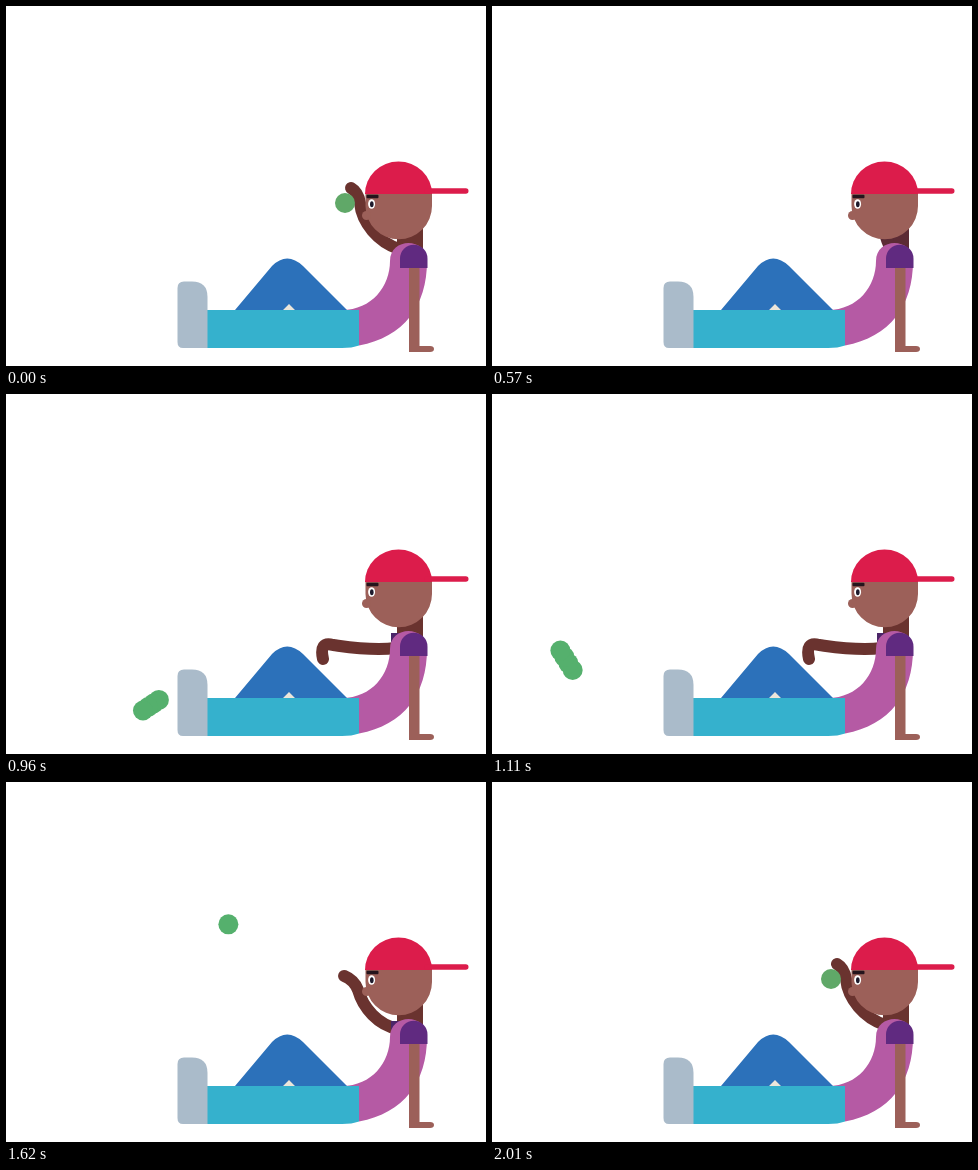
An HTML page without scripts that plays this animation: 480 by 360 pixels, repeating every 2.04 s.

```html
<!DOCTYPE html>
<html lang="en">
<head>
<meta charset="utf-8">
<title>Ball against the wall</title>
<style>
html, body { margin: 0; width: 100%; height: 100%; overflow: hidden; background: #fff; }
svg { display: block; width: 100vw; height: 100vh; --loop: 2.04s; }
.skin { fill: #9c6059; }
.cap { fill: #dc1c4b; }
.far { animation: shade var(--loop) linear infinite; }
.neck { fill: currentColor; }
.arm {
  fill: none; stroke: currentColor; stroke-width: 12;
  stroke-linecap: round; stroke-linejoin: round;
  animation: arm var(--loop) linear infinite;
}
.cuff { fill: #4b2568; animation: cuff var(--loop) step-end infinite; }

/* the trail is the same ball, each copy 10 ms later */
.ball circle {
  r: 10px;
  animation: across var(--loop) infinite, height var(--loop) infinite, tint var(--loop) step-end infinite;
  animation-delay: calc(var(--lag, 0) * 10ms - var(--loop));
}
.trail { animation: trail var(--loop) step-end infinite; }

@keyframes shade {
  0%, 38%, 100% { color: #6a332f; }
  14.7%, 26.5% { color: #5a2a36; }
}
@keyframes cuff {
  0%, 80.9%, 100% { opacity: 0; }
  33.8% { opacity: 1; }
}
@keyframes trail {
  0%, 55.9%, 100% { opacity: 0; }
  28% { opacity: 1; }
}
@keyframes tint {
  0%, 88.2%, 100% { fill: #60a868; }
  14.7% { fill: #6eaf79; }
  26.5% { fill: #55b06d; }
}

/* wind up, slow down towards the wall, come back evenly */
@keyframes across {
  0% { cx: 339px; animation-timing-function: ease-in-out; }
  14.7% { cx: 429px; }
  26.47% { cx: 429px; animation-timing-function: cubic-bezier(.33, .52, .67, .85); }
  63.4% { cx: 9px; animation-timing-function: linear; }
  88.24%, 100% { cx: 339px; }
}
/* straight down to the floor, then one parabola up and down */
@keyframes height {
  0% { cy: 197px; animation-timing-function: ease-in-out; }
  14.7% { cy: 168px; }
  26.47% { cy: 168px; animation-timing-function: linear; }
  49.26% { cy: 332px; animation-timing-function: cubic-bezier(.33, .67, .67, 1); }
  74.02% { cy: 133px; animation-timing-function: cubic-bezier(.33, 0, .67, .33); }
  88.24%, 100% { cy: 197px; }
}
/* poses: ready, back, release, droop, reach */
@keyframes arm {
  0%, 88.24%, 100% { d: path("M393 243 C372 236 356 217 354 197 Q352 186 345 182"); animation-timing-function: ease-in-out; }
  14.7% { d: path("M404 242 C404 225 410 210 421 198 Q434 186 446 167"); }
  26.47% { d: path("M404 242 C404 225 410 210 421 198 Q434 186 446 167"); animation-timing-function: cubic-bezier(0, 0, .4, 1); }
  38.24% { d: path("M390 255 C365 258 335 254 322 250 Q312 248 305 253"); }
  46%, 56% { d: path("M390 254 C365 257 342 253 327 251 Q313 247 317 265"); }
  79.41% { d: path("M392 247 C372 243 357 226 352 208 Q348 198 338 194"); }
}
</style>
</head>
<body>
<svg viewBox="0 0 480 360">
  <g class="far">
    <rect class="neck" x="391" y="215" width="26" height="40"/>
    <path class="arm"/>
  </g>
  <g class="ball">
    <g class="trail">
      <circle style="--lag: 3"/>
      <circle style="--lag: 2"/>
      <circle style="--lag: 1"/>
    </g>
    <circle/>
  </g>
  <rect class="cuff" x="385" y="239" width="10" height="9"/>

  <!-- head -->
  <path class="skin" d="M359.500 187H426V200A33.250 33.250 0 0 1 359.500 200Z"/>
  <ellipse class="skin" cx="360.500" cy="209.500" rx="4.500" ry="4.500"/>
  <path class="cap" d="M359 188A33.500 32.500 0 0 1 426 188Z"/>
  <rect class="cap" x="418" y="182.300" width="44.500" height="5.400" rx="2.700"/>
  <rect x="360.500" y="188.800" width="12" height="3.400" rx="1" fill="#24141c"/>
  <ellipse cx="365.600" cy="198" rx="3.500" ry="4.800" fill="#fff"/>
  <ellipse cx="365.800" cy="198.200" rx="1.800" ry="3" fill="#1d1a2c"/>

  <!-- legs and torso -->
  <path fill="#b55aa4" d="M336 304C366 304 384 280 384 255C384 231 421 231 421 255C421 300 398 331 353 339.500Z"/>
  <path fill="#ece6da" d="M276 304L283 297L290 304Z"/>
  <path fill="#2c71ba" d="M229 304L266 260Q281 245 297 260L341 304H289L283 298L277 304Z"/>
  <path fill="#35b1cd" d="M201 304H353V339.500Q346 342 336 342H201Z"/>
  <path fill="#aabbca" d="M171.500 282Q171.500 275.500 178 275.500H186Q201.500 275.500 201.500 291V342H177Q171.500 342 171.500 336Z"/>

  <!-- near arm -->
  <path class="skin" d="M403 260H413.500V340H424Q428 340 428 343Q428 346 424 346H403Z"/>
  <path fill="#602a80" d="M394 262V252.500A13.750 13.750 0 0 1 421.500 252.500V262Z"/>
</svg>
</body>
</html>
```
